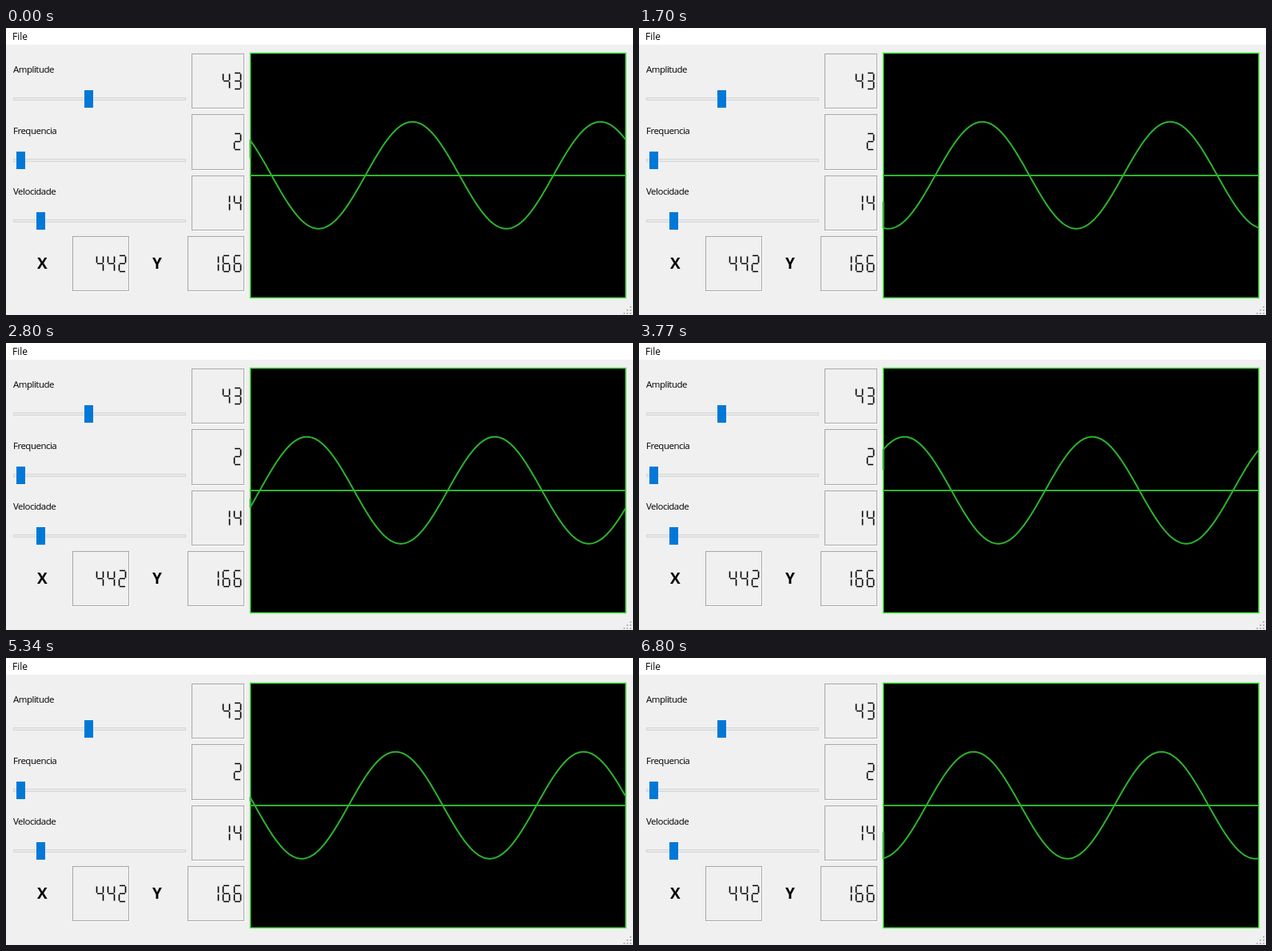
An HTML page for the animation above (6.83 s loop, 784 by 360 pixels).

```html
<!DOCTYPE html>
<html lang="pt">
<head>
<meta charset="utf-8">
<title>Onda</title>
<style>
  html, body { margin: 0; width: 100%; height: 100%; overflow: hidden; background: #f0f0f0; }
  svg { display: block; }
  text { font-family: "Open Sans", "Noto Sans", sans-serif; fill: #000; }
  .label { font-size: 11.5px; letter-spacing: -0.5px; }
  .axis { font-size: 19px; font-weight: 700; }
  .wave { fill: none; stroke: #2cb52c; stroke-width: 2; stroke-linejoin: round; }
</style>
</head>
<body>
<svg id="stage" width="784" height="360" viewBox="0 0 784 360">
  <rect width="784" height="360" fill="#f0f0f0"/>
  <rect width="784" height="21" fill="#fff"/>
  <text x="8" y="15" font-size="12">File</text>
  <g id="panel"></g>
  <text class="axis" x="39" y="302">X</text>
  <text class="axis" x="183" y="302">Y</text>
  <rect x="305.5" y="31.5" width="469.5" height="307" fill="#000" stroke="#3ce53c" stroke-width="1.5"/>
  <path d="M305 185H774" stroke="#2cb52c" stroke-width="2"/>
  <path id="wave" class="wave"/>
  <g id="grip" fill="#b8b8b8"></g>
</svg>
<script>
const NS = "http://www.w3.org/2000/svg";
const panel = document.getElementById("panel");
const grip = document.getElementById("grip");
const wave = document.getElementById("wave");

function add(parent, tag, attrs, text) {
  const el = document.createElementNS(NS, tag);
  for (const key in attrs) el.setAttribute(key, attrs[key]);
  if (text) el.textContent = text;
  parent.appendChild(el);
}

// Seven-segment strokes in an 8 x 20 cell
const SEGMENTS = {
  a: "M0.5 0h7", b: "M8 1v8", c: "M8 11v8", d: "M0.5 20h7",
  e: "M0 11v8", f: "M0 1v8", g: "M0.5 10h7"
};
const DIGITS = { 1: "bc", 2: "abged", 3: "abgcd", 4: "fgbc", 6: "afgedc" };

function lcd(x, y, w, h, value) {
  add(panel, "path", { d: `M${x + 1} ${y + h + 0.5}H${x + w + 0.5}V${y + 1}`, fill: "none", stroke: "#fff" });
  add(panel, "rect", { x: x + 0.5, y: y + 0.5, width: w - 1, height: h - 1, fill: "none", stroke: "#a8a8a8" });
  const chars = [...String(value)];
  chars.forEach((ch, i) => {
    const left = x + w - 13 - 14 * (chars.length - 1 - i);
    add(panel, "path", {
      d: [...DIGITS[ch]].map(s => SEGMENTS[s]).join(""),
      transform: `translate(${left + 0.5} ${y + 24.5})`,
      fill: "none", stroke: "#000", "stroke-width": 1.6
    });
  });
}

function slider(name, textY, handleX, value, boxY, boxH) {
  add(panel, "text", { class: "label", x: 9, y: textY }, name);
  add(panel, "rect", { x: 9, y: textY + 31, width: 216, height: 4, fill: "#d6d6d6" });
  add(panel, "rect", { x: 10, y: textY + 32, width: 214, height: 2, fill: "#e7eaea" });
  add(panel, "rect", { x: handleX, y: textY + 22, width: 11, height: 22, fill: "#0078d7" });
  lcd(232, boxY, 66, boxH, value);
}

slider("Amplitude", 56, 98, 43, 32, 69);
slider("Frequencia", 133, 13, 2, 108, 70);
slider("Velocidade", 209, 38, 14, 185, 69);
lcd(83, 261, 71, 69, 442);
lcd(227, 261, 71, 69, 166);

for (let row = 0; row < 3; row++)
  for (let col = 0; col <= row; col++)
    add(grip, "rect", { x: 780 - 4 * col, y: 349 + 4 * row, width: 2, height: 2 });

const LOOP = 6830, TICK = 33.38;
const LEFT = 305, RIGHT = 774, MID = 184.7, AMP = 67, PERIOD = 235;
// Tick and leftward travel in pixels
const TRAVEL = [[0, 1], [26, 43], [51, 80], [84, 133], [113, 177.5], [160, 257], [204, 326]];

function travelAt(tick) {
  const i = Math.max(1, TRAVEL.findIndex(p => p[0] >= tick));
  const [t0, s0] = TRAVEL[i - 1], [t1, s1] = TRAVEL[i];
  return s0 + (s1 - s0) * (tick - t0) / (t1 - t0);
}

function draw(time) {
  const t = Math.floor((time % LOOP) / 10) * 10;
  const tick = Math.min(204, Math.floor((t + 9.99) / TICK));
  const origin = 450 - travelAt(tick);
  const offset = x => -AMP * Math.sin(2 * Math.PI * (x - origin) / PERIOD);
  // The trace enters from half of its first height
  let d = `M${LEFT + 0.5} ${(MID + offset(LEFT) / 2).toFixed(2)}`;
  for (let x = LEFT; x <= RIGHT; x++) d += `L${x + 0.5} ${(MID + offset(x)).toFixed(2)}`;
  wave.setAttribute("d", d);
}

const start = performance.now();
function loop() {
  draw(performance.now() - start);
  requestAnimationFrame(loop);
}
loop();
</script>
</body>
</html>
```
